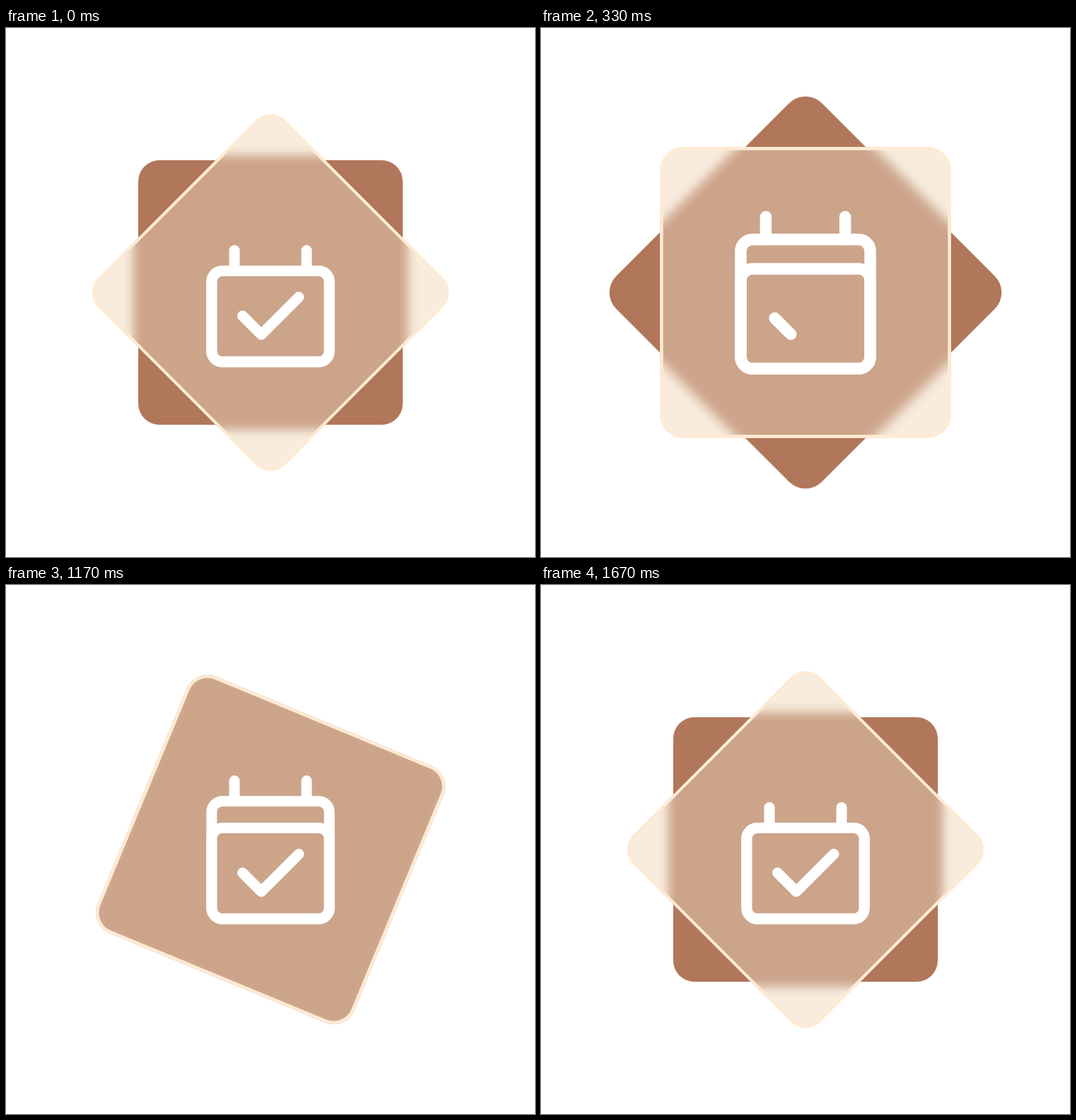
These frames come from a looping animation (748x748 px, 2000 ms). An HTML page:

```html
<!DOCTYPE html>
<html lang="en">
<head>
<meta charset="utf-8">
<title>Calendar check</title>
<style>
  html, body { margin: 0; width: 100%; height: 100%; overflow: hidden; background: #fff; }
  svg { display: block; width: 100%; height: 100%; }
  .base { fill: #b1775a; }
  .pane { fill: #f7ecdd; }
  .blurred { fill: #cca48a; filter: url(#soft); }
  .rim { fill: none; stroke: #ffebd4; stroke-width: 4; }
  .icon { fill: none; stroke: #fff; stroke-width: 15; stroke-linecap: round; stroke-linejoin: round; }
</style>
</head>
<body>
<svg viewBox="-374 -374 748 748">
  <defs>
    <filter id="soft" x="-20%" y="-20%" width="140%" height="140%" color-interpolation-filters="sRGB">
      <feGaussianBlur stdDeviation="7"/>
    </filter>
    <clipPath id="window">
      <rect class="glass" x="-187" y="-187" width="374" height="374" rx="30"/>
    </clipPath>
  </defs>

  <rect class="base card" x="-187" y="-187" width="374" height="374" rx="30"/>
  <rect class="pane glass" x="-187" y="-187" width="374" height="374" rx="30"/>
  <g clip-path="url(#window)">
    <rect class="blurred card" x="-194" y="-194" width="388" height="388" rx="37"/>
  </g>
  <rect class="rim glass" x="-185" y="-185" width="370" height="370" rx="28"/>

  <g class="icon" id="icon">
    <rect x="-83.2" y="-30.4" width="166.4" height="128.4" rx="15"/>
    <rect id="lid" x="-83.2" width="166.4" rx="15"/>
    <path id="rings" d="M-51-59.5V-30.4M51-59.5V-30.4"/>
    <path id="tick" pathLength="1" d="M-39.5 33L-13 59.5L40 6.5"/>
  </g>
</svg>

<script>
  const FPS = 30, LOOP = 60, HALF = 30, LIFT = 37.8;
  const $ = id => document.getElementById(id);
  const cards = document.querySelectorAll('.card');
  const panes = document.querySelectorAll('.glass');

  // Eased progress from frame a to frame b
  function ease(f, a, b) {
    const s = Math.min(1, Math.max(0, (f - a) / (b - a)));
    return s * s * (3 - 2 * s);
  }

  function place(list, angle, scale) {
    for (const el of list) el.setAttribute('transform', `rotate(${angle}) scale(${scale})`);
  }

  function draw(frame) {
    const back = frame >= HALF;
    const f = frame % HALF;
    const move = (a, b) => back ? 1 - ease(f, a, b) : ease(f, a, b);

    const turn = move(0, 10);
    place(cards, 45 * turn, 1 + 0.1 * turn);
    place(panes, 45 * (1 - turn), 1 + 0.1 * turn);

    $('icon').setAttribute('transform', `scale(${1 + 0.1 * move(0, 5)})`);

    const lift = LIFT * move(5, 10);
    $('lid').setAttribute('y', -30.4 - lift);
    $('lid').setAttribute('height', 128.4 + lift);
    $('rings').setAttribute('transform', `translate(0 ${-lift})`);

    // The tick retracts to its start, then draws again
    const shown = 1 - ease(f, 5, 12.5) + ease(f, 12.5, 20);
    $('tick').setAttribute('stroke-dasharray', shown < 1 ? `${shown} 2` : 'none');
  }

  function tick() {
    // Steps fall on whole hundredths of a second, slightly ahead of the exact rate
    draw(Math.floor((performance.now() + 3.4) * FPS / 1000) % LOOP);
    requestAnimationFrame(tick);
  }
  tick();
</script>
</body>
</html>
```
